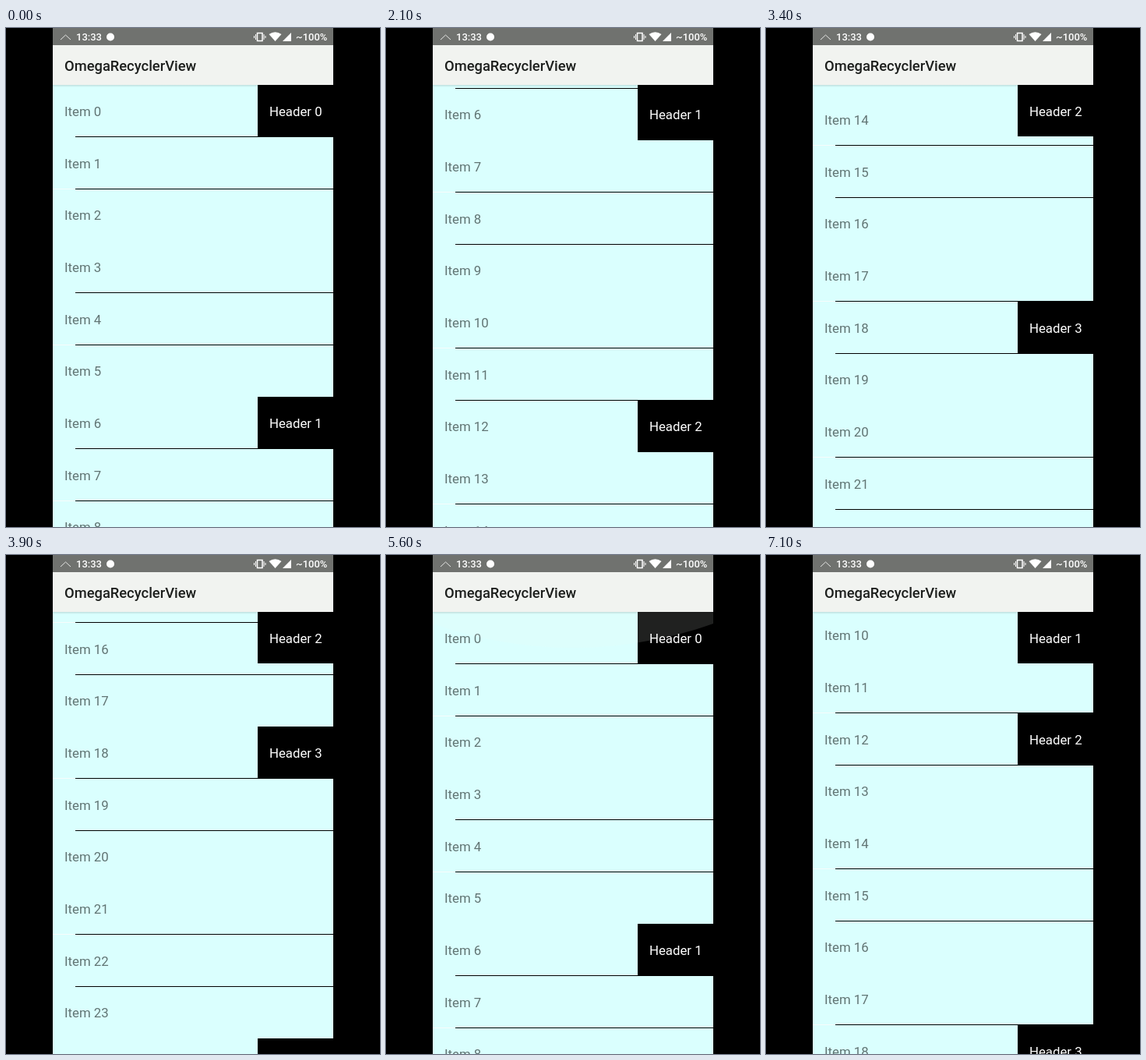
An HTML page with a canvas that plays this animation: 480x640 px, repeating every 8.1 s.

```html
<!DOCTYPE html>
<html lang="en">
<head>
<meta charset="utf-8">
<title>Sticky header list</title>
<style>
  html, body { margin: 0; width: 100%; height: 100%; overflow: hidden; background: #000; }
  canvas { display: block; width: 480px; height: 640px; }
</style>
</head>
<body>
<canvas id="stage" width="480" height="640"></canvas>
<script>
const ctx = document.getElementById('stage').getContext('2d');
const LOOP = 8100, STEP = 100, LAST = 7100;
const LEFT = 60, RIGHT = 420, WIDTH = RIGHT - LEFT, TOP = 73, BOTTOM = 640;

// The list is laid out in device pixels, three to one stage pixel.
const SCALE = 3, PITCH = 200, ROW = 198, GROUP = 6;
const HEADER_X = 323, LINE_X = 89;
const FONT = 'Roboto, "Noto Sans", sans-serif';

const linear = p => p;
const drag = p => p * p * (3 - 2 * p);
const fling = p => 1 - (1 - p) ** 4.7;
const flingToEdge = p => p * (1.7 - 0.7 * p);

// time, scroll offset, easing towards it
const scrollKeys = [
  [900, 0],
  [1400, 1189, drag],
  [2900, 1185, linear],
  [4700, 3204, fling],
  [5500, 0, flingToEdge],
  [5700, 0, linear],
  [7100, 2011, fling]
];

function scrollAt(t) {
  if (t <= scrollKeys[0][0]) return 0;
  const i = scrollKeys.findIndex(key => t <= key[0]);
  const [t0, from] = scrollKeys[i - 1];
  const [t1, to, ease] = scrollKeys[i];
  return Math.round(from + (to - from) * ease((t - t0) / (t1 - t0)));
}

function rect(x, y, w, h, color) {
  ctx.fillStyle = color;
  ctx.fillRect(x, y, w, h);
}

function text(str, x, y, size, color, weight = 400) {
  ctx.font = `${weight} ${size}px ${FONT}`;
  ctx.fillStyle = color;
  ctx.fillText(str, x, y);
}

function polygon(points, color) {
  ctx.beginPath();
  points.forEach(([x, y]) => ctx.lineTo(x, y));
  ctx.closePath();
  ctx.fillStyle = color;
  ctx.fill();
}

const baseline = top => TOP + 40 + Math.round(top / SCALE);

function drawItem(n, scroll) {
  const top = n * PITCH - scroll;
  text(`Item ${n}`, 75, baseline(top), 16.8, '#617473');

  // Two-pixel dividers vanish when they fall between sampled rows.
  const end = top + PITCH;
  if (end % SCALE === 0) return;
  const y = TOP + Math.floor(end / SCALE);
  if (y % 2 === 0) rect(LEFT, y, LINE_X - LEFT, 1, '#f6fcfb');
  rect(LINE_X, y, RIGHT - LINE_X, 1, '#000');
}

function drawHeader(n, top) {
  rect(HEADER_X, TOP + Math.ceil(top / SCALE), RIGHT - HEADER_X, ROW / SCALE, '#000');
  text(`Header ${n}`, 338, baseline(top), 16.8, '#fff');
}

function drawGlow(t) {
  const power = t < 5600 ? (t - 5400) / 200 : (6000 - t) / 400;
  if (power <= 0) return;
  const radius = WIDTH * 1.5;
  ctx.beginPath();
  ctx.arc(LEFT + WIDTH / 2, TOP + 46 * power - radius, radius, 0, Math.PI * 2);
  ctx.fillStyle = `rgba(241,243,240,${0.135 * power})`;
  ctx.fill();
}

function drawList(t) {
  const scroll = scrollAt(t);
  ctx.save();
  ctx.beginPath();
  ctx.rect(LEFT, TOP, WIDTH, BOTTOM - TOP);
  ctx.clip();
  rect(LEFT, TOP, WIDTH, BOTTOM - TOP, '#dafffe');

  const first = Math.floor(scroll / PITCH);
  for (let n = Math.max(0, first - 1); n < first + 11; n++) drawItem(n, scroll);

  const span = GROUP * PITCH;
  const current = Math.floor(scroll / span);
  const next = (current + 1) * span - scroll;
  drawHeader(current, Math.min(0, next - ROW));
  drawHeader(current + 1, next);
  drawHeader(current + 2, next + span);
  drawGlow(t);

  const shade = ctx.createLinearGradient(0, TOP, 0, TOP + 3);
  shade.addColorStop(0, 'rgba(0,0,0,0.13)');
  shade.addColorStop(1, 'rgba(0,0,0,0)');
  rect(LEFT, TOP, WIDTH, 3, shade);
  ctx.restore();
}

function drawStatusBar() {
  const white = '#fff';
  rect(LEFT, 0, WIDTH, 22, '#70726f');

  ctx.strokeStyle = '#e4e5e3';
  ctx.lineWidth = 1;
  ctx.beginPath();
  ctx.moveTo(70, 15);
  ctx.lineTo(76.5, 9);
  ctx.lineTo(83, 15);
  ctx.stroke();

  text('13:33', 90, 16, 13, white, 500);
  ctx.beginPath();
  ctx.arc(134, 11.5, 5, 0, Math.PI * 2);
  ctx.fillStyle = white;
  ctx.fill();

  // vibrate
  ctx.strokeStyle = white;
  ctx.lineWidth = 1.5;
  ctx.strokeRect(322.5, 6.5, 6.5, 10);
  rect(320, 8, 1, 7, white);
  rect(318, 10, 1, 3, white);
  rect(330.5, 8, 1, 7, white);
  rect(332.5, 10, 1, 3, white);

  // wifi
  ctx.beginPath();
  ctx.moveTo(345.5, 17);
  ctx.lineTo(337.5, 8);
  ctx.quadraticCurveTo(345.5, 2.5, 353.5, 8);
  ctx.closePath();
  ctx.fillStyle = white;
  ctx.fill();

  polygon([[355, 17], [366, 17], [366, 6]], white);
  text('~100%', 372, 16, 13, white, 500);
}

function draw(t) {
  rect(0, 0, 480, 640, '#000');
  drawList(t);
  rect(LEFT, 22, WIDTH, TOP - 22, '#f1f3f0');
  text('OmegaRecyclerView', 75, 55, 18.35, '#1d1f1d', 500);
  drawStatusBar();
}

const start = performance.now();
function tick() {
  const t = (performance.now() - start) % LOOP;
  draw(Math.min(LAST, Math.floor(t / STEP) * STEP));
  requestAnimationFrame(tick);
}
tick();
</script>
</body>
</html>
```
